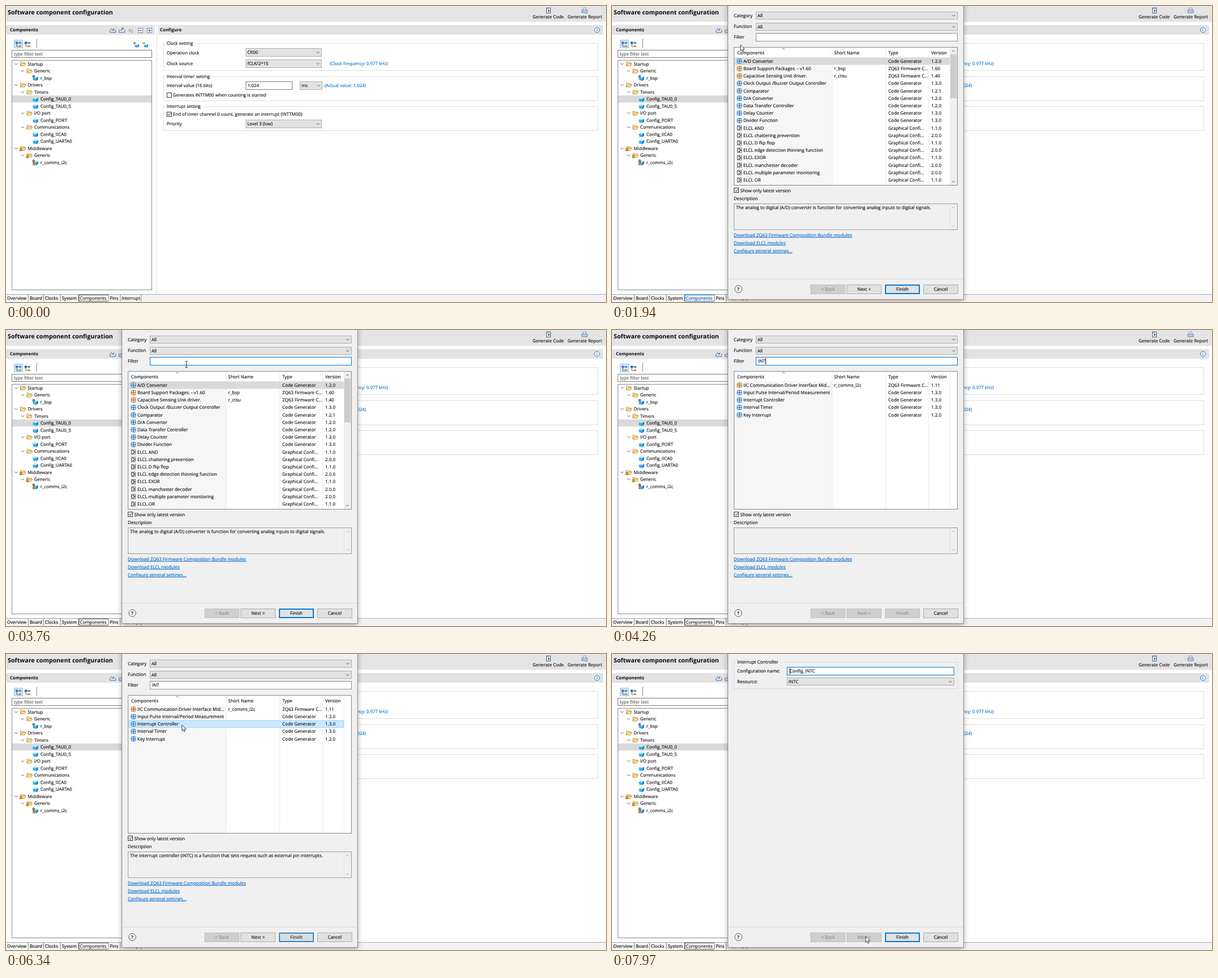
Write an HTML page that moves like this. It is 1064 px wide and 526 px high and loops after 8000 ms.

```html
<!DOCTYPE html>
<html lang="en">
<head>
<meta charset="utf-8">
<title>Software component configuration</title>
<style>
html, body { margin: 0; width: 100%; height: 100%; overflow: hidden; background: #fff; }
svg { display: block; width: 100vw; height: 100vh; }
text { font: 7.9px "Open Sans", "Noto Sans", sans-serif; color: #0a0a0a; fill: currentColor; stroke: currentColor; stroke-width: .14px; text-rendering: geometricPrecision; white-space: pre; }
.b { font-weight: 700; stroke: none; }
.title { font-size: 10.7px; font-weight: 700; stroke: none; }
.link { color: #0066cc; text-decoration: underline; }
.blue { color: #0070d0; }
.hint { color: #555; }
.off { color: #8b8b8b; }
.mid { text-anchor: middle; }
#dialog { transform-origin: 414px 215px; }
#dialog text { font-size: 8px; }
#frame { filter: drop-shadow(0 3px 5px rgba(0, 0, 0, .3)); }
</style>
</head>
<body>
<svg id="stage" viewBox="0 0 1064 526" preserveAspectRatio="none"></svg>
<script>
const LOOP = 8000;
const FAMILY = 'ZQ63 Firmware Composition Bundle';

// y is the middle of the capitals
const text = (x, y, s, cls = '', id = '') =>
  `<text x="${x}" y="${y + 2.8}" class="${cls}" id="${id}">${s}</text>`;
const fill = (x, y, w, h, color, extra = '') =>
  `<rect x="${x}" y="${y}" width="${w}" height="${h}" fill="${color}" ${extra}/>`;
const box = (x, y, x2, y2, color, edge, extra = '') =>
  fill(x + .5, y + .5, x2 - x - 1, y2 - y - 1, color, `stroke="${edge}" ${extra}`);
const line = (d, color, w = 1, extra = '') =>
  `<path d="${d}" fill="none" stroke="${color}" stroke-width="${w}" ${extra}/>`;
const group = (id, body, extra = '') => `<g id="${id}" ${extra}>${body}</g>`;
const at = (x, y, body) => `<g transform="translate(${x} ${y})">${body}</g>`;
const chevron = (x, y, color = '#444', r = 2.6) =>
  line(`M${x - r} ${y - r / 2}l${r} ${r}l${r} ${-r}`, color, .9);
const chevronUp = (x, y, color, r = 2.6) =>
  line(`M${x - r} ${y + r / 2}l${r} ${-r}l${r} ${r}`, color, .9);
const combo = (x, y, x2, s, h = 15) =>
  box(x, y, x2, y + h, '#e3e3e3', '#adadad') + text(x + 3, y + h / 2, s) + chevron(x2 - 7, y + h / 2);
const check = (x, y, on) =>
  box(x, y, x + 9, y + 9, '#fff', '#333') +
  (on ? line(`M${x + 2} ${y + 4.4}l2 2.2l3.4 -4.4`, '#111') : '');
const frameBox = (x, y, x2, y2, s, w, bg) =>
  box(x, y, x2, y2, 'none', '#dcdcdc') + fill(x + 4, y - 2, w, 5, bg) + text(x + 6, y + .5, s);

// icons, drawn around their centre
const folder = (x, y) => at(x, y,
  '<path d="M-4.5 3.5V-3.5H-1L0 -2.3H3.5V-.8" fill="#fff0c4" stroke="#c08a2c" stroke-width=".9"/>' +
  '<path d="M-4.5 3.5L-2.3 -.6H5.2L3 3.5Z" fill="#ffe3a0" stroke="#c08a2c" stroke-width=".9"/>');
const cube = (x, y, k = 1) => at(x, y, `<g transform="scale(${k})">` +
  '<path d="M-4.5 -1L-1 -3.5L5 -2.5L2 -.2Z" fill="#b5e6fb"/><path d="M-4.5 -1L2 -.2V5L-4 3.8Z" fill="#38aeee"/>' +
  '<path d="M2 -.2L5 -2.5V2.5L2 5Z" fill="#1a80c6"/></g>');
const badge = (x, y) => `<circle cx="${x - 3}" cy="${y - 3}" r="2.2" fill="#555"/>` +
  fill(x - 3.5, y - 4, 1, 2, '#eee');
const lock = (x, y) => fill(x - 5, y + 1, 5, 4, '#c78b31') + line(`M${x - 4} ${y + 1}v-1.5h3v1.5`, '#8c6420', .8);
const gridIcon = (x, y, c, pale) => `<rect x="${x - 4}" y="${y - 4}" width="8" height="8" rx="2" fill="${pale}" stroke="${c}"/>` +
  line(`M${x} ${y - 4}v8M${x - 4} ${y}h8`, c, 1.3);
const gateIcon = (x, y) => box(x - 4, y - 4.5, x + 4, y + 4.5, '#e8e6dc', '#777') +
  line(`M${x - 3.5} ${y - 4}v8`, '#444') +
  line(`M${x - 2} ${y - 2.5}h2l2 2.5l-2 2.5h-2M${x + 1} ${y}h2.5`, '#333', 1.1);
const treeIcon = (x, y, c) => fill(x - 5, y - 4.5, 4, 4, c) + line(`M${x - 3} ${y}v4h4M${x - 1} ${y - 2.5}h3`, '#555', .9) +
  fill(x + 1, y - 4, 4, 3, '#3d8fce') + fill(x + 1, y + 2, 4, 3, '#c9993c');
const sheetIcon = (x, y) => box(x - 4, y - 5, x + 4, y + 5, '#fff', '#456') +
  `<path d="M${x - 1} ${y - 2}l4 2.5l-4 2.5Z" fill="#2f6fae"/>` + line(`M${x - 2.5} ${y - 3}h4`, '#888', .8);
const printIcon = (x, y) => box(x - 3, y - 5, x + 3, y, '#fff', '#8a9ab5') +
  `<rect x="${x - 5}" y="${y - 1}" width="10" height="5" rx="1" fill="#b9cdea" stroke="#5578ae" stroke-width=".9"/>`;
const trayIcon = (x, y, d) => line(`M${x - 5} ${y - 1}v5h10v-5`, '#4a6fa5') + line(d, '#3a78c2', 1.1);
const foldIcon = (x, plus) => box(x - 4, 39, x + 5, 48, '#fff', '#6e8fb5') +
  line(`M${x - 2} 43.5h5${plus ? `M${x + .5} 41v5` : ''}`, '#2c5d98');

const TREE = [
  [0, 'Startup'], [1, 'Generic'], [2, 'r_bsp', 1], [0, 'Drivers'], [1, 'Timers'],
  [2, 'Config_TAU0_0'], [2, 'Config_TAU0_5'], [1, 'I/O port'], [2, 'Config_PORT'],
  [1, 'Communications'], [2, 'Config_IICA0'], [2, 'Config_UARTA0'],
  [0, 'Middleware'], [1, 'Generic'], [2, 'r_comms_i2c', 2]
];
const treeRow = ([depth, name, mark], i) => {
  const y = 103 + i * 12.5;
  if (depth === 2) return cube(52, y) + (mark ? badge(52, y) : '') + (mark === 2 ? lock(52, y) : '') + text(61, y, name);
  const x = 18 + depth * 11.5;
  return chevron(x, y) + folder(x + 12, y) + (i > 11 ? lock(x + 11, y) : '') + text(x + 20.5, y, name);
};

const TABS = [['Overview', 2, 39], ['Board', 42, 66], ['Clocks', 69, 96], ['System', 99, 128],
  ['Components', 131, 181, 'tabName'], ['Pins', 184, 202], ['Interrupt', 205, 239]];

const background = () =>
  fill(0, 0, 1064, 526, '#fff') + fill(0, 0, 1064, 28, '#e4e4e4') + text(3, 12.5, 'Software component configuration', 'title') +
  sheetIcon(962, 8) + printIcon(1026, 8) + text(934, 19.5, 'Generate Code') + text(996, 19.5, 'Generate Report') +
  fill(0, 34, 264, 17, '#e3e3e3') + text(7, 42.5, 'Components', 'b') +
  trayIcon(189.5, 43, 'M186 40l3 3l3 -3M189 43h3') + trayIcon(205.5, 43, 'M203 44l5 -5M205 39h3v3') +
  text(217, 42, 'a', 'off') + text(222, 45, 'z', 'off') + line('M219 47l6 -7', '#aaa', .9) +
  foldIcon(238, false) + foldIcon(254, true) +
  fill(267, 34, 1, 478, '#dedede') + fill(270, 34, 789, 17, '#e3e3e3') + text(273, 42.5, 'Configure', 'b') +
  '<circle cx="1048" cy="42.5" r="4.5" fill="#fff" stroke="#1874c4"/>' + fill(1047.4, 41.7, 1.2, 3.2, '#1874c4') + fill(1047.4, 39.8, 1.2, 1.1, '#1874c4') +
  box(14, 60, 30, 75, '#cce8ff', '#90c8f6') + treeIcon(22, 68, '#7a5ba8') + treeIcon(38, 68, '#555') + fill(54, 58, 1, 16, '#8c8c8c') +
  group('addHot', box(223, 61, 239, 75, '#d9ecfb', '#90c8f6')) +
  cube(232, 70, .8) + line('M225.5 66h5M228 63.5v5', '#c97a1c', 1.7) +
  cube(248, 70, .8) + line('M242 66h5', '#c97a1c', 1.7) +
  box(10, 78, 259, 92, '#fff', '#7a7a7a') + text(14, 85.5, 'type filter text', 'hint') +
  box(10, 96, 259, 505, '#fff', '#7f8790') + fill(11, 159, 247, 12.5, '#d9d9d9') +
  fill(11, 97, 247, 12.5, '#e5f3ff', 'id="treeHot"') + TREE.map(treeRow).join('') +
  frameBox(279, 66, 1050, 115, 'Clock setting', 52, '#fff') +
  text(285, 83, 'Operation clock') + combo(425, 75, 560, 'CK00') +
  text(285, 102.5, 'Clock source') + combo(425, 95, 560, 'fCLK/2^15') + text(574, 102.5, '(Clock frequency: 0.977 kHz)', 'blue') +
  frameBox(279, 125, 1050, 169, 'Interval timer setting', 81, '#fff') +
  text(285, 141.5, 'Interval value (16 bits)') + box(425, 134, 508, 149, '#fff', '#7a7a7a') + text(428.5, 141.5, '1.024') +
  combo(521, 134, 561, 'ms') + text(565, 141.5, '(Actual value: 1.024)', 'blue') +
  check(285, 154, false) + text(296, 158.5, 'Generates INTTM00 when counting is started') +
  frameBox(279, 178, 1050, 222, 'Interrupt setting', 64, '#fff') +
  check(285, 188, true) + text(296, 192.5, 'End of timer channel 0 count, generate an interrupt (INTTM00)') +
  text(285, 209.5, 'Priority') + combo(425, 202, 560, 'Level 3 (low)') +
  fill(0, 512, 1064, 14, '#f3f3f3') + fill(0, 512, 1064, 1, '#a8a8a8') +
  box(129, 513, 182, 525, '#fff', '#555', 'id="tab"') +
  TABS.map(([s, x, end, id]) => text(x, 519, s, '', id) + fill(end, 513, 1, 12, '#8c8c8c')).join('');

const CODE = 'Code Generator', GATE = 'Graphical Confi...', PACK = FAMILY.slice(0, 15) + '...';
const gen = (name, version) => [name, '', CODE, version];
const elcl = (name, version) => ['ELCL ' + name, '', GATE, version];
const ALL = [
  gen('A/D Converter', '1.2.0'), ['Board Support Packages. - v1.60', 'r_bsp', PACK, '1.60'],
  ['Capacitive Sensing Unit driver.', 'r_ctsu', PACK, '1.40'],
  gen('Clock Output /Buzzer Output Controller', '1.3.0'), gen('Comparator', '1.2.1'), gen('D/A Converter', '1.2.0'),
  gen('Data Transfer Controller', '1.2.0'), gen('Delay Counter', '1.3.0'), gen('Divider Function', '1.3.0'),
  elcl('AND', '1.1.0'), elcl('chattering prevention', '2.0.0'), elcl('D flip flop', '1.1.0'),
  elcl('edge detection thinning function', '2.0.0'), elcl('EXOR', '1.1.0'), elcl('manchester decoder', '2.0.0'),
  elcl('multiple parameter monitoring', '2.0.0'), elcl('OR', '1.1.0')
];
const FOUND = [
  ['IIC Communication Driver Interface Mid...', 'r_comms_i2c', PACK, '1.11'],
  gen('Input Pulse Interval/Period Measurement', '1.3.0'), gen('Interrupt Controller', '1.3.0'),
  gen('Interval Timer', '1.3.0'), gen('Key Interrupt', '1.2.0')
];
const ROW = 13.2, TOP = 91.4;
const listRow = ([name, short, type, version], i) => {
  const y = 98 + i * ROW;
  const icon = type === GATE ? gateIcon(226, y) : type === CODE ? gridIcon(226, y, '#2f78b7', '#cfe6f7') : gridIcon(226, y, '#b5702a', '#f7e0c4');
  return icon + text(233, y, name) + text(394, y, short) + text(490, y, type) + text(566, y, version);
};
const rows = list => list.map(listRow).join('');

const button = (x, s, id) =>
  box(x, 495, x + 62, 512, '#cfcfcf', '#bfbfbf') + text(x + 31, 503.5, s, 'mid off') +
  group(id, box(x, 495, x + 62, 512, '#e1e1e1', '#adadad', `id="${id}Face"`) + text(x + 31, 503.5, s, 'mid'));

const listPage = () =>
  text(216, 17, 'Category') + combo(255, 10, 613, 'All', 14) + text(216, 36.5, 'Function') + combo(255, 30, 613, 'All', 14) +
  text(216, 55.5, 'Filter') + box(255, 48, 613, 63, '#fff', '#8c8c8c', 'id="filter"') + text(259, 55.5, '', '', 'typed') +
  fill(272, 50, 1, 11, '#000', 'id="caret"') +
  box(216, 73, 613, 319, '#fff', '#828790') + fill(217, 91, 173, 227, '#f6f6f6') +
  [390, 485, 561, 599].map(x => fill(x, 74, 1, 244, '#ececec')).join('') +
  chevronUp(304, 76, '#666', 2.4) +
  text(222, 83, 'Components') + text(394, 83, 'Short Name') + text(490, 83, 'Type') + text(566, 83, 'Version') +
  fill(218, TOP, 381, ROW, '#e5f3ff', 'id="hot"') + box(218, TOP, 599, TOP + ROW, '#d9d9d9', '#d9d9d9', 'id="picked"') +
  group('all', rows(ALL) + fill(600, 74, 12, 244, '#f0f0f0') + fill(600, 86, 11, 78, '#cdcdcd') + chevronUp(605.5, 80, '#444') + chevron(605.5, 312)) +
  group('found', rows(FOUND)) +
  check(216, 323, true) + text(227.5, 328, 'Show only latest version') + text(216, 342.5, 'Description') +
  box(216, 351, 613, 398, '#f0f0f0', '#9a9a9a') + fill(599, 352, 1, 45, '#e4e4e4') +
  chevronUp(605.5, 358, '#aaa') + chevron(605.5, 391, '#aaa') + text(220, 358.5, '', '', 'about') +
  text(216, 407, `Download ${FAMILY} modules`, 'link') + text(216, 421, 'Download ELCL modules', 'link') +
  text(216, 435, 'Configure general settings...', 'link');

const namePage = () =>
  frameBox(216, 14, 613, 62, 'Interrupt Controller', 79, '#f0f0f0') +
  text(222, 30.5, 'Configuration name:') + box(310, 23, 607, 38, '#fff', '#0078d7') + text(315, 30.5, 'Config_INTC') + fill(315, 25, 1, 11, '#000') +
  text(222, 49, 'Resource:') + combo(310, 42, 607, 'INTC', 14);

const dialog = () => group('dialog',
  box(205, -90, 624, 522, '#f0f0f0', '#8a8a8a', 'id="frame"') +
  group('listPage', listPage()) + group('namePage', namePage()) +
  fill(206, 485, 417, 1, '#dcdcdc') +
  '<circle cx="224" cy="503" r="6.3" fill="#f6f6f6" stroke="#555"/>' + text(224, 503, '?', 'mid b') +
  button(352, '&lt; Back', 'back') + button(416, 'Next &gt;', 'next') + button(484, 'Finish', 'finish') + button(552, 'Cancel', 'cancel'));

const pointer = () =>
  group('arrow', '<path d="M0 0V10.6L2.4 8.4L4 12L5.7 11.3L4.1 7.7H7.4Z" fill="#fff" stroke="#111" stroke-width=".8"/>') +
  group('beam', line('M-2 -5.5H-.6L0 -5L.6 -5.5H2M0 -5V5M-2 5.5H-.6L0 5L.6 5.5H2', '#111', .9));

const stage = document.getElementById('stage');
stage.innerHTML = background() + dialog() + pointer();
const el = {};
stage.querySelectorAll('[id]').forEach(n => { if (n.id) el[n.id] = n; });

const PATH = [
  [90, 984, 522], [480, 560, 250], [700, 256, 112], [880, 251, 80], [1390, 228, 69], [1940, 228, 69],
  [2590, 319, 92], [2690, 319, 92], [2980, 320, 61], [3240, 320, 61], [5230, 320, 61],
  [5430, 325, 113], [5650, 319, 127], [6020, 312, 126], [6390, 312, 126],
  [6580, 404, 440], [6830, 404, 440], [7630, 450, 502], [8000, 450, 502]
];
const clamp = v => Math.max(0, Math.min(1, v));
const ramp = (t, a, b) => clamp((t - a) / (b - a));
const between = (t, a, b) => t >= a && t < b;
const show = (node, on) => node.setAttribute('visibility', on ? 'inherit' : 'hidden');
const set = (node, attrs) => { for (const k in attrs) node.setAttribute(k, attrs[k]); };

// Hermite curve through the stops, at rest wherever the pointer waits
function slope(i, c) {
  const a = PATH[i - 1], p = PATH[i], b = PATH[i + 1];
  if (!a || !b || a[c] === p[c] || b[c] === p[c]) return 0;
  return (b[c] - a[c]) / (b[0] - a[0]);
}
function pointerAt(t) {
  let i = 0;
  while (i < PATH.length - 2 && t >= PATH[i + 1][0]) i++;
  const a = PATH[i], b = PATH[i + 1], d = b[0] - a[0], u = ramp(t, a[0], b[0]), v = 1 - u;
  return [1, 2].map(c => a[c] * v * v * (1 + 2 * u) + b[c] * u * u * (3 - 2 * u) +
    d * u * v * (slope(i, c) * v - slope(i + 1, c) * u));
}

function update(t) {
  const [x, y] = pointerAt(t);
  const place = `translate(${x.toFixed(2)} ${y.toFixed(2)})`;
  const open = t >= 1800, second = t >= 7740, filtered = t >= 4140, chosen = t >= 6180;

  const overField = between(t, 2690, 5400) && y > 48 && y < 63;
  const visible = t >= 90 && !between(t, 3790, 5230);
  set(el.arrow, { transform: place });
  set(el.beam, { transform: place });
  show(el.arrow, visible && !overField);
  show(el.beam, visible && overField);

  const row = Math.floor((y - 97) / 12.5);
  show(el.treeHot, between(t, 90, 900) && x < 258 && row >= 0 && row !== 5 && row < TREE.length);
  set(el.treeHot, { y: 97 + row * 12.5 });
  show(el.addHot, between(t, 1100, 1800));
  set(el.addHot.firstChild, { fill: between(t, 1550, 1650) ? '#b5dbf7' : '#d9ecfb' });
  const tabLit = between(t, 1550, 2000);
  set(el.tab, { stroke: tabLit ? '#0078d7' : '#555' });
  el.tabName.style.color = tabLit ? '#123f70' : '';

  const grow = 1 - (1 - ramp(t, 1800, 1930)) ** 3;
  show(el.dialog, open);
  set(el.dialog, { opacity: grow });
  el.dialog.style.transform = `scale(${.94 + .06 * grow})`;
  show(el.listPage, open && !second);
  show(el.namePage, second);
  if (!open) return;

  const focused = between(t, 3200, 6170);
  set(el.filter, { stroke: focused ? '#0078d7' : overField ? '#333' : '#8c8c8c' });
  el.typed.textContent = 'INT'.slice(0, [3800, 3980, 4140].filter(k => t >= k).length);
  set(el.caret, { x: t < 3800 ? 259 : t < 3980 ? 262 : t < 4140 ? 268 : 272 });
  show(el.caret, !second && (between(t, 3220, 3740) || between(t, 3800, 4760) || between(t, 5480, 5980)));

  show(el.all, !second && !filtered);
  show(el.found, !second && filtered);
  const hot = Math.floor((y - TOP) / ROW);
  show(el.hot, !second && between(t, 5230, 6580) && hot >= 0 && hot < FOUND.length);
  set(el.hot, { y: TOP + hot * ROW });
  show(el.picked, !second && (!filtered || chosen));
  const lit = chosen || between(t, 2500, 3190);
  set(el.picked, { y: TOP + .5 + (chosen ? 2 * ROW : 0), fill: lit ? '#cce8ff' : '#d9d9d9',
    stroke: chosen ? '#99d1ff' : lit ? '#cce8ff' : '#d9d9d9' });
  el.about.textContent = chosen ? 'The interrupt controller (INTC) is a function that sets request such as external pin interrupts.'
    : filtered ? '' : 'The analog to digital (A/D) converter is function for converting analog inputs to digital signals.';

  const idle = between(t, 4140, 6180);
  show(el.back, false);
  show(el.next, !idle && !second);
  const over = t >= 7200 && x > 416 && y > 495;
  set(el.nextFace, { fill: t >= 7660 ? '#cce4f7' : over ? '#e5f1fb' : '#e1e1e1', stroke: over ? '#0078d7' : '#adadad' });
  set(el.finish, { opacity: t < 4140 ? 1 : t < 6180 ? 1 - ramp(t, 4140, 4250) : ramp(t, 6180, 6390) });
}

// the default button has a double edge inside its bounds
set(el.finishFace, { x: 485, y: 496, width: 60, height: 15, stroke: '#0078d7', 'stroke-width': 2 });

const start = performance.now();
function tick(now) {
  update(Math.max(0, now - start) % LOOP);
  requestAnimationFrame(tick);
}
update(0);
requestAnimationFrame(tick);
</script>
</body>
</html>
```
